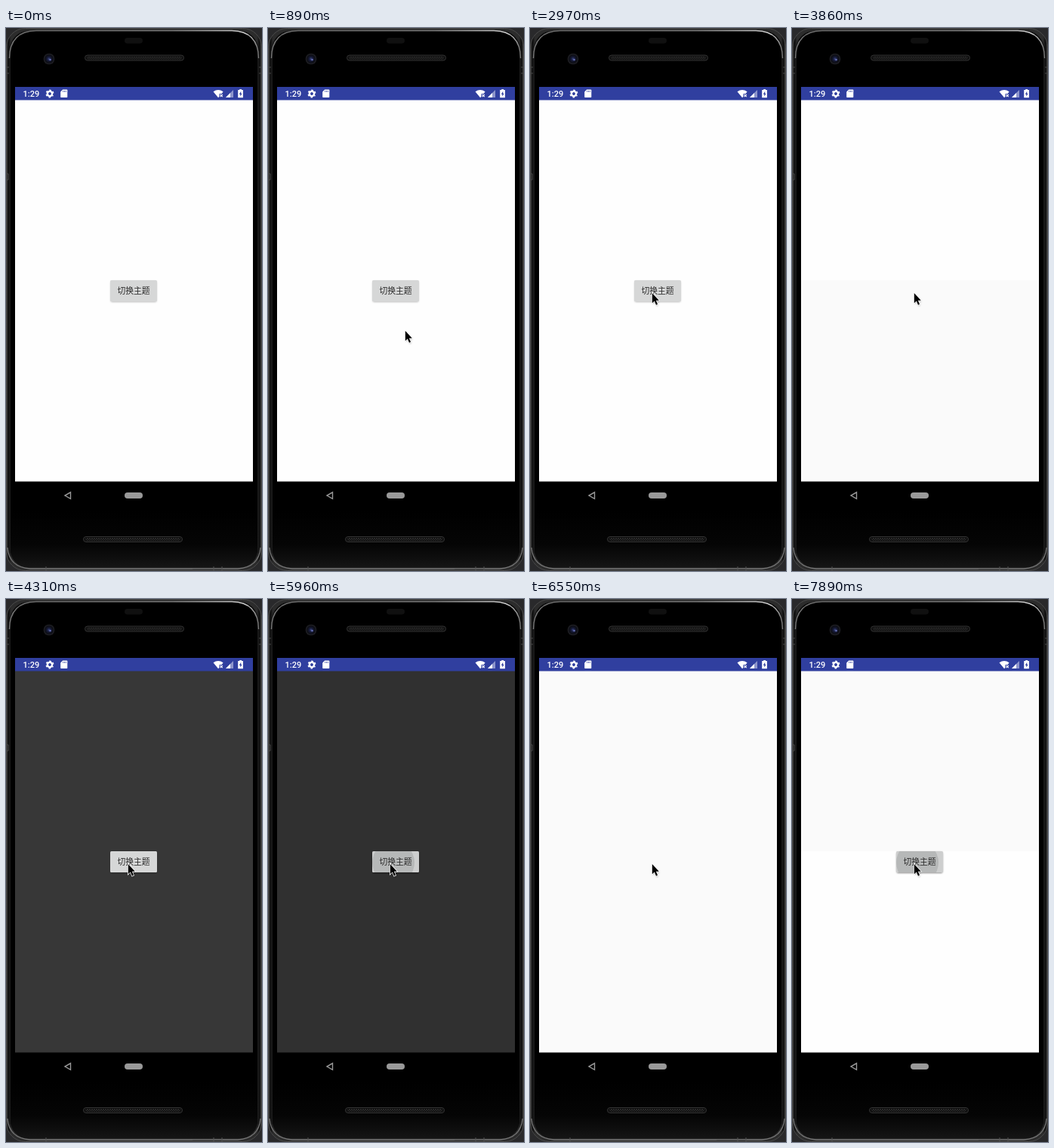
An HTML page that plays this animation: 339 by 719 pixels, repeating every 8000 ms.

```html
<!DOCTYPE html>
<html lang="zh-CN">
<head>
<meta charset="utf-8">
<title>Theme switch</title>
<style>
  html, body { margin: 0; width: 100%; height: 100%; overflow: hidden; background: #29292b; }
  svg { display: block; width: 339px; height: 719px; }
  .clock { font: 500 11px Roboto, sans-serif; fill: #fff; }
  .label { font: 300 10.8px "Noto Sans CJK SC", "Noto Sans CJK", sans-serif; fill: #2b2b2b; text-anchor: middle; }
</style>
</head>
<body>
<svg viewBox="0 0 339 719">
  <defs>
    <linearGradient id="rim">
      <stop offset="0" stop-color="#4a4a4a"/><stop offset=".008" stop-color="#0b0b0b"/>
      <stop offset=".018" stop-color="#2c2c2c"/><stop offset=".982" stop-color="#2c2c2c"/>
      <stop offset=".992" stop-color="#0b0b0b"/><stop offset="1" stop-color="#4a4a4a"/>
    </linearGradient>
    <linearGradient id="chin" x2="0" y2="1">
      <stop offset="0" stop-color="#000"/><stop offset=".6" stop-color="#050505"/>
      <stop offset="1" stop-color="#151515"/>
    </linearGradient>
    <linearGradient id="sheen">
      <stop offset="0" stop-color="#777"/><stop offset=".1" stop-color="#666"/>
      <stop offset=".65" stop-color="#777"/><stop offset=".95" stop-color="#ccc"/>
      <stop offset="1" stop-color="#777"/>
    </linearGradient>
    <radialGradient id="lens">
      <stop offset="0" stop-color="#3c477c"/><stop offset=".35" stop-color="#151936"/>
      <stop offset=".7" stop-color="#0d0e14"/><stop offset="1" stop-color="#25252a"/>
    </radialGradient>
    <pattern id="mesh" width="3" height="3" patternUnits="userSpaceOnUse">
      <path d="M0 3L3 0M0 0L3 3" stroke="#3a3a3a" stroke-width=".6"/>
    </pattern>
    <clipPath id="face"><rect x="138" y="334" width="62" height="28" rx="1.5"/></clipPath>
    <filter id="soft" x="-20%" y="-30%" width="140%" height="170%"><feGaussianBlur stdDeviation=".8"/></filter>
    <g id="speaker">
      <rect x=".5" y=".5" width="131" height="7" rx="3.5" fill="#0e0e0e" stroke="#333"/>
      <rect x="3" y="2" width="126" height="4" rx="2" fill="url(#mesh)"/>
    </g>
  </defs>

  <!-- phone body -->
  <rect width="339" height="719" fill="#29292b"/>
  <rect x=".5" y=".5" width="338" height="718" rx="25" fill="url(#rim)" stroke="#4a4a4a"/>
  <rect x="5.5" y="4" width="328" height="710" rx="24" fill="#000" stroke="#1b1b1b"/>
  <path d="M6 640H333V690a24 24 0 0 1-24 24H30a24 24 0 0 1-24-24Z" fill="url(#chin)"/>
  <path d="M4.5 40Q5 4 40 3.5H299Q334 4 334.5 40" fill="none" stroke="url(#sheen)" stroke-width="1.4"/>
  <path d="M2 688Q4 714 32 716H307Q335 714 337 688" fill="none" stroke="#777" stroke-width="1.3"/>
  <path d="M53 713v5M247 716.5h40M275 713v5M286 713v5" stroke="#555"/>
  <path d="M0 52h4M0 60h4M335 52h4M335 60h4M0 193h3v8h-3" fill="none" stroke="#484848"/>
  <rect x="157" y="13" width="24" height="7.5" rx="3.7" fill="#101010"/>
  <circle cx="57" cy="41" r="7.3" fill="url(#lens)"/>
  <circle cx="58.5" cy="42" r="1.3" fill="#6670b4"/>
  <use href="#speaker" x="104" y="35.5"/>
  <use href="#speaker" x="102" y="673"/>

  <!-- screen -->
  <rect x="12" y="78" width="315" height="18" fill="#303f9f"/>
  <rect id="upper" x="12" y="95.5" width="315" height="238.5"/>
  <rect id="lower" x="12" y="334" width="315" height="266.5"/>
  <text class="clock" x="22.5" y="91">1:29</text>
  <g fill="none" stroke="#fff" transform="rotate(30 58 87)">
    <circle cx="58" cy="87" r="3.1" stroke-width="2.4"/>
    <circle cx="58" cy="87" r="4.7" stroke-width="1.6" stroke-dasharray="2.4 2.52" stroke-dashoffset="1.2"/>
  </g>
  <path d="M75.2 81.5H80.5Q81.3 81.5 81.3 82.3V91.2Q81.3 92 80.5 92H73Q72.2 92 72.2 91.2V84.5Z" fill="#fff"/>
  <path d="M75.7 83v1.8M77.5 83v1.8M79.3 83v1.8" stroke="#303f9f" stroke-width=".8"/>
  <path d="M274.5 84.3Q281 79.6 287.6 84.3L285.6 86.9H282.5V90.7L281.1 92.2Z" fill="#fff"/>
  <path d="M283.6 88l3.2 3.2M286.8 88l-3.2 3.2" stroke="#fff" stroke-width="1.1"/>
  <path d="M291 92L301 82V92Z" fill="#8d95cb"/>
  <path d="M291 92L297 86V92Z" fill="#fff"/>
  <path d="M309.2 81h2.8v1.1h1.9V92.2H307.2V82.1h2Z" fill="#fff"/>
  <path d="M311.2 83.8l-2.4 3.9h1.5v2.9l2.3-3.9h-1.4Z" fill="#303f9f"/>
  <path d="M85.5 614.8V623.4L78 619.1Z" fill="none" stroke="#999" stroke-width="1.4"/>
  <rect x="157" y="615" width="24" height="8" rx="4" fill="#999"/>

  <g id="button">
    <rect id="shadow" x="138.5" y="335" width="61" height="28" rx="2" filter="url(#soft)"/>
    <g clip-path="url(#face)">
      <rect id="fill" x="138" y="334" width="62" height="29"/>
      <circle id="ripple" cx="166" cy="349" fill="#b6b8b8"/>
    </g>
    <text class="label" x="169" y="352">切换主题</text>
  </g>

  <g id="cursor">
    <path d="M2.2 2.5V15.5L5.2 13L7.6 18.3L9.8 17.4L7.7 12.4H11.8Z" fill="#000" opacity=".3" filter="url(#soft)"/>
    <path d="M1.8 1V14.3L4.8 11.5L7 16.7L9 15.8L6.9 10.7H10.8Z" fill="#000" stroke="#fff" stroke-width="1.5" paint-order="stroke"/>
  </g>
</svg>
<script>
const LOOP = 8000;
const $ = id => document.getElementById(id);
const set = (id, attrs) => {
  for (const k in attrs) $(id).setAttribute(k, attrs[k]);
};

// Pointer travel: start, end, number of held steps, from, to
const moves = [
  [450, 1330, 7, [213, 515], [169, 361]],
  [1630, 1780, 2, [170, 354], [171, 347]],
  [2670, 2970, 3, [168, 348], [160, 350]]
];

const WHITE = '#fefefe', PALE = '#fafafa', DARK = '#303030';
// time, upper colour, lower colour, button state
const scenes = [
  [0, WHITE, WHITE, 'rest'],
  [3270, WHITE, WHITE, 'spread'],
  [3420, WHITE, WHITE, 'full'],
  [3570, WHITE, WHITE, 'fade'],
  [3710, WHITE, WHITE, 'rest'],
  [3860, WHITE, PALE, 'gone'],
  [4310, '#373737', '#373737', 'rest'],
  [4460, DARK, DARK, 'rest'],
  [5960, DARK, DARK, 'spread'],
  [6110, DARK, DARK, 'full'],
  [6260, DARK, DARK, 'fade'],
  [6400, '#2b2b2b', '#2b2b2b', 'rest'],
  [6550, PALE, PALE, 'gone'],
  [7000, PALE, WHITE, 'enter'],
  [7140, PALE, WHITE, 'rest'],
  [7890, PALE, WHITE, 'spread']
];

// face colour, ripple radius, ripple opacity, shadow opacity, button opacity
const looks = {
  gone: ['#d6d7d7', 0, 0, 0, 0],
  enter: ['#d6d7d7', 0, 0, .2, .85],
  rest: ['#d6d7d7', 0, 0, .25, 1],
  spread: ['#cdcece', 28, 1, .45, 1],
  full: ['#c6c7c7', 46, 1, .5, 1],
  fade: ['#d0d1d1', 46, .5, .4, 1]
};

const ease = u => u * (2 - u);

function pointerAt(t) {
  const move = moves.filter(m => t >= m[0]).pop();
  if (!move) return null;
  const [start, end, steps, from, to] = move;
  const gap = (end - start) / (steps - 1);
  const step = Math.min(steps - 1, Math.floor((t - start) / gap + .02));
  const u = ease(step / (steps - 1));
  return from.map((v, i) => Math.round(v + (to[i] - v) * u));
}

function draw(t) {
  const [, upper, lower, state] = scenes.filter(s => t >= s[0]).pop();
  const [face, radius, ink, shade, alpha] = looks[state];
  set('upper', { fill: upper });
  set('lower', { fill: lower });
  set('button', { opacity: alpha });
  set('fill', { fill: face });
  set('ripple', { r: radius, opacity: ink });
  set('shadow', { opacity: shade });
  const p = pointerAt(t);
  set('cursor', p ? { opacity: 1, transform: `translate(${p})` } : { opacity: 0 });
}

const origin = performance.now();
function tick() {
  draw((performance.now() - origin) % LOOP);
  requestAnimationFrame(tick);
}
tick();
</script>
</body>
</html>
```
